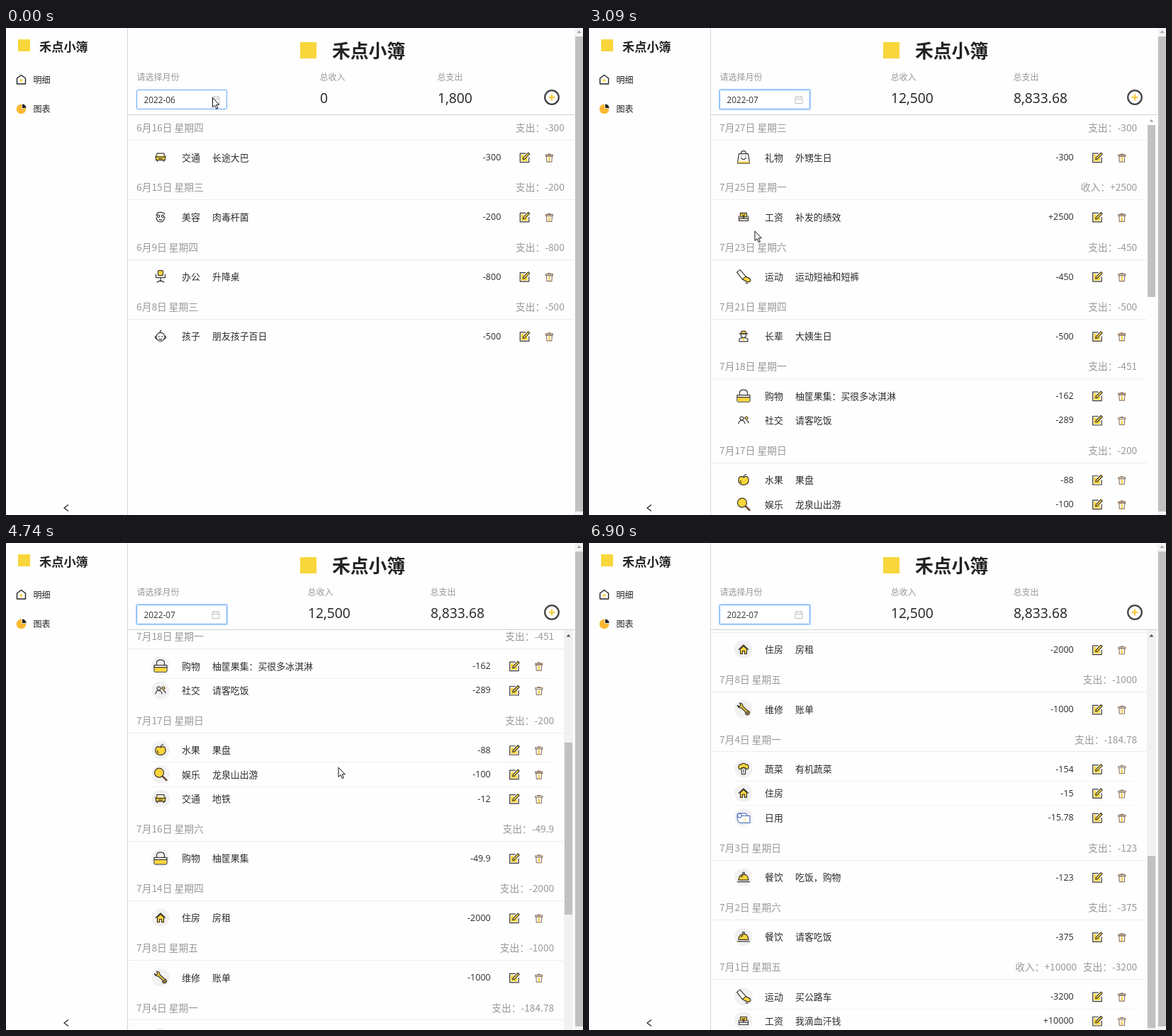
These frames come from a looping animation (814x688 px, 7.9 s). An HTML page:

```html
<!DOCTYPE html>
<html lang="zh-CN">
<head>
<meta charset="utf-8">
<title>记账</title>
<style>
html, body { margin: 0; width: 100%; height: 100%; overflow: hidden; background: #fefefe; }
#stage { position: relative; width: 814px; height: 688px; overflow: hidden; }
svg { position: absolute; left: 0; top: 0; overflow: visible; }
text { font-family: "Noto Sans CJK SC", "Noto Sans CJK", sans-serif; white-space: pre; }
text.num { font-family: "Open Sans", "Noto Sans", sans-serif; }
.ic { fill: none; stroke: #3b3733; stroke-width: 1.2; stroke-linejoin: round; stroke-linecap: round; }
.ic .y { fill: #fbd63a; }
.ic .w { fill: #fff; }
.ic .d { fill: #3b3733; stroke: none; }
.ic .g { fill: #fbd63a; stroke: none; }
.fresh .soft { visibility: hidden; }
#popup {
  position: absolute; left: 184px; top: 118px; width: 241px; height: 262px;
  background: #fff; border-radius: 2px; transform-origin: 0 0;
  box-shadow: 0 3px 5px -3px rgba(0,0,0,.12), 0 5px 14px rgba(0,0,0,.08), 0 8px 24px 7px rgba(0,0,0,.05);
}
</style>
</head>
<body>
<div id="stage">
  <svg id="page" width="814" height="688"></svg>
  <div id="popup"><svg id="months" width="241" height="262"></svg></div>
  <svg id="pointer" width="814" height="688">
    <path id="arrow" d="M.5 .5V14L3.6 11.1L5.8 16.2L7.9 15.3L5.7 10.3H9.8Z" fill="#fff" stroke="#111"/>
    <path id="hand" d="M-1.3 13V2Q-1.3 .5 .2 .5T1.7 2V7Q2 5.900 3.300 6T4.600 7.500Q5 6.600 6.200 6.800T7.300 8.300Q7.700 7.500 8.700 7.800T9.600 9.500V14Q9.600 16.500 8 18V20.300H.2V18.500Q-2 16.500-4.600 12.300Q-5 10.800-3.700 10.600T-1.300 13M1.700 7V11M4.600 8V11M7.300 8.500V11" fill="#fff" stroke="#111" stroke-linejoin="round"/>
  </svg>
</div>
<script>
const LOOP = 7900;
const $ = id => document.getElementById(id);

// y is the middle of the glyphs
function txt(x, y, s, size, fill, o = {}) {
  const base = y + size * (o.num ? .357 : .38);
  return `<text x="${x}" y="${base.toFixed(2)}" font-size="${size}" fill="${fill}"` +
    ` text-anchor="${o.anchor || 'start'}" font-weight="${o.weight || 400}"` +
    `${o.num ? ' class="num"' : ''}${o.id ? ` id="${o.id}"` : ''}>${s}</text>`;
}
const rect = (x, y, w, h, fill, more = '') =>
  `<rect x="${x}" y="${y}" width="${w}" height="${h}" fill="${fill}" ${more}/>`;
const use = (name, x, y) => `<use href="#${name}" x="${x}" y="${y}"/>`;

const ICONS = {
  car: '<path class="w" d="M-5.500 0L-5-5.500H5L5.500 0Z"/><path class="y" d="M-7-2V-.5H7V-2M-6.500-.5H6.500V4H-6.500Z"/><path d="M-4.500 4V6M4.500 4V6M-2.500 2H2.500"/>',
  face: '<path d="M-6-2Q-5-7 0-6.500Q4-7 6-4M-6 1Q-5 7 0 7T6 0"/><circle cx="-3" cy="-1" r="1.700"/><circle cx="3" cy="-1" r="1.700"/><path d="M-2 3.500Q0 5 2 3.500"/>',
  chair: '<rect class="y" x="-3.500" y="-8.500" width="7" height="7" rx="1"/><path d="M-6.500-3V1.500H6.500V-3M0 1.500V7M-5 8L0 5.500L5 8"/>',
  baby: '<circle cx="0" cy="1" r="6"/><path d="M-6 0Q-8 0-7.500 2T-5.500 3.500M6 0Q8 0 7.500 2T5.500 3.500M0-5Q-2-7 1-8M-2 4Q0 5.500 2 4"/><path class="d" d="M-3 0h1.500v1.500h-1.500ZM1.500 0H3v1.500H1.500Z"/>',
  gift: '<path class="w" d="M-6.500-5H6.500L8.500 8.500H-8.500Z"/><path class="g" d="M-8 6H8L8.300 8H-8.300Z"/><path d="M-3.500-5Q-3.500-9 0-9T3.500-5M-3.500 1Q0 5 3.500 1M-3-2v.5M3-2v.5"/>',
  cash: '<path class="y" d="M-4.500-5.500H4.500V0H-4.500Z"/><path d="M-6.500-1V5.500H6.500V-1M-6.500 2.500H6.500M-2-3.500L0-1.500L2-3.500M0-1.500V2M-2 0H2"/>',
  sport: '<path class="w" d="M-9.500-6L-5-9.500L3.500 0L-1.500 4Z"/><path class="y" d="M3 0L9 3Q11 5 8.500 7.500Q4 8-1.500 4Z"/><path d="M3 9L6 9.500"/>',
  elder: '<path class="y" d="M-4-3.500L-2.500-7H2.500L4-3.500Z"/><path d="M-6-3.500H6M-3.500-3V0Q0 4.500 3.500 0V-3"/><path class="w" d="M-6 7.500V4L-2.500 2L0 4.500L2.500 2L6 4V7.500Z"/><path class="g" d="M-2 3H2L0 7Z"/>',
  shop: '<path class="w" d="M-9-1H9V7Q9 8.500 7.500 8.500H-7.500Q-9 8.500-9 7Z"/><path class="g" d="M-8.300 2.500H8.300V8H-8.300Z"/><path d="M-5.500-1V-4Q-5.500-8.500 0-8.500T5.500-4V-1M-9 2H9"/>',
  social: '<circle cx="-2.500" cy="-2.500" r="2.500"/><path d="M-7 5Q-6.500.5-2.500.5T2 5M4 .5Q7 1 7 4"/><circle class="y" cx="4" cy="-3" r="2"/>',
  fruit: '<path class="y" d="M0-3.500Q6-7 7.300 0Q7 7 0 7.300Q-7 7-7.300 0Q-6-7 0-3.500Z"/><path d="M0-3.500Q0-7 4-7.500M-4.500 1Q-4.500 3-3 4"/>',
  fun: '<path d="M3 3L8.500 8.500" style="stroke:#6d4a33;stroke-width:2.600"/><circle class="y" cx="-2" cy="-2" r="6.500"/>',
  house: '<path class="y" d="M-4.500-1V6H-1.500V2H1.500V6H4.500V-1L0-5Z"/><path d="M-6.800 0L0-6.500L6.800 0"/>',
  wrench: '<path class="y" d="M-8.500-5.500L-6-3.500L-4-5.500L-5.500-8.500Q-1-9-1-4L5.500 2Q9 2 8.500 6Q7 9 3.500 7.500Q2 6 3 4L-3.500-2Q-8-1.500-8.500-5.500Z"/><circle class="w" cx="5.500" cy="5" r="1.200"/>',
  veg: '<path class="y" d="M-7-1Q-8-6-3-6.500Q0-9 3-6.500Q8-6 7-1Q5 2 3-1Q0-3-3-1Q-5 2-7-1Z"/><path class="w" d="M-3 0Q0-3 3 0L2.500 7.500H-2.500Z"/><path d="M0 1V5"/>',
  daily: '<g style="stroke:#5d7cc4"><path class="w" d="M-6-6H2Q5-6 5-2.500H9V7.500H-5Q-9 7-9-2.500Q-8.500-6-6-6Z"/><ellipse cx="-5.500" cy="-2.800" rx="3" ry="3"/><path d="M5-2.500H-3"/><path d="M2 2V3M2 5V6" style="stroke:#fbd63a"/></g>',
  meal: '<path class="y" d="M-7 4Q-6.500-4 0-4T7 4Z"/><circle class="w" cx="0" cy="-5.500" r="1.400"/><path d="M-8.500 6.500H8.500M-3.500 0Q-2.500-1.500-1-2"/>',
  edit: '<path d="M1-6H-6.500V6.500H6V0"/><path class="g" d="M-5-4H-1L-3.500 3L4 .5V5H-5Z"/><path class="y" d="M-2.500 2.500L-2 0L5-7L7-5L0 2Z"/>',
  bin: '<g style="stroke:#8c7460;stroke-width:1.100"><path class="w" d="M-4-2.500H4L3.500 5.500H-3.500Z"/><path d="M-5-2.500V-4.500H5V-2.500ZM-1.500-4.500V-5.500H1.500V-4.500"/><path d="M0 0V4" style="stroke:#f3c62c;stroke-width:2"/></g>'
};

// [date, weekday, totals, [icon, kind, note, amount]...]
const JUNE = [
  ['6月16日', '四', ['支出：-300'], ['car', '交通', '长途大巴', '-300']],
  ['6月15日', '三', ['支出：-200'], ['face', '美容', '肉毒杆菌', '-200']],
  ['6月9日', '四', ['支出：-800'], ['chair', '办公', '升降桌', '-800']],
  ['6月8日', '三', ['支出：-500'], ['baby', '孩子', '朋友孩子百日', '-500']]
];
const JULY = [
  ['7月27日', '三', ['支出：-300'], ['gift', '礼物', '外甥生日', '-300']],
  ['7月25日', '一', ['收入：+2500'], ['cash', '工资', '补发的绩效', '+2500']],
  ['7月23日', '六', ['支出：-450'], ['sport', '运动', '运动短袖和短裤', '-450']],
  ['7月21日', '四', ['支出：-500'], ['elder', '长辈', '大姨生日', '-500']],
  ['7月18日', '一', ['支出：-451'], ['shop', '购物', '柚筐果集：买很多冰淇淋', '-162'], ['social', '社交', '请客吃饭', '-289']],
  ['7月17日', '日', ['支出：-200'], ['fruit', '水果', '果盘', '-88'], ['fun', '娱乐', '龙泉山出游', '-100'], ['car', '交通', '地铁', '-12']],
  ['7月16日', '六', ['支出：-49.9'], ['shop', '购物', '柚筐果集', '-49.9']],
  ['7月14日', '四', ['支出：-2000'], ['house', '住房', '房租', '-2000']],
  ['7月8日', '五', ['支出：-1000'], ['wrench', '维修', '账单', '-1000']],
  ['7月4日', '一', ['支出：-184.78'], ['veg', '蔬菜', '有机蔬菜', '-154'], ['house', '住房', '', '-15'], ['daily', '日用', '', '-15.78']],
  ['7月3日', '日', ['支出：-123'], ['meal', '餐饮', '吃饭，购物', '-123']],
  ['7月2日', '六', ['支出：-375'], ['meal', '餐饮', '请客吃饭', '-375']],
  ['7月1日', '五', ['支出：-3200', '收入：+10000'], ['sport', '运动', '买公路车', '-3200'], ['cash', '工资', '我滴血汗钱', '+10000']]
];

function list(days, right) {
  let y = 141, out = '';
  for (const [date, week, totals, ...items] of days) {
    out += txt(184, y, `${date} 星期${week}`, 13.76, '#999');
    totals.forEach((s, i) => out += txt(right - 85 * i, y, s, 13.76, '#999', { anchor: 'end' }));
    out += rect(172, Math.round(y + 17), right - 159, 1, '#ececec');
    items.forEach(([icon, kind, note, sum], i) => {
      const m = y + 41.6 + 34.4 * i;
      out += `<circle class="soft" cx="218" cy="${m}" r="12.700" fill="#f1f1f1"/>`;
      out += use(icon, 218, m) + txt(248, m, kind, 12.9, '#2b2b2b') + txt(291, m, note, 12.9, '#2b2b2b');
      out += txt(right - 89.5, m, sum, 12.5, '#2b2b2b', { num: 1, anchor: 'end' });
      out += use('edit', right - 56, m + .5) + use('bin', right - 21.4, m + 1);
      if (i) out += rect(204, Math.round(m - 17.5), right - 208, 1, '#f1f1f1', 'class="soft"');
    });
    y += 84.25 + 34.4 * (items.length - 1);
  }
  return out;
}

function totals(id, x1, income, x2, spent) {
  return `<g id="${id}">` + txt(x1, 69.5, '总收入', 12, '#999') + txt(x2, 69.5, '总支出', 12, '#999') +
    txt(x1 + .5, 99.5, income, 19.3, '#222', { num: 1 }) + txt(x2 + .5, 99.5, spent, 19.3, '#222', { num: 1 }) + '</g>';
}

const APP = '禾点小簿', YELLOW = '#f8d63c', DARK = '#333';
$('page').innerHTML =
  '<defs>' + Object.entries(ICONS).map(([k, d]) => `<g id="${k}" class="ic">${d}</g>`).join('') +
  '<clipPath id="view"><rect x="172" y="123" width="630" height="565"/></clipPath></defs>' +
  rect(171, 0, 1, 688, '#d6d6d6') + rect(171, 122, 631, 1, '#d0d0d0') +
  rect(17, 16, 17, 17, YELLOW) + txt(47, 26, APP, 17.2, '#222', { weight: 700 }) +
  rect(415, 20, 23, 23, YELLOW) + txt(460, 32.5, APP, 25.8, '#222', { weight: 700 }) +
  '<g class="ic"><path d="M15.500 71L21.500 66.500L27.500 71V79H15.500Z" style="stroke:#222;stroke-width:1.400"/><circle class="g" cx="21.500" cy="74" r="2"/></g>' +
  txt(38.5, 73, '明细', 12.1, '#222') +
  '<circle cx="21.500" cy="114.500" r="6.800" fill="#fbb830"/><path d="M22.500 113.500V107A6.500 6.500 0 0 1 29 113.500Z" fill="#222" stroke="#fefefe" stroke-width=".8"/>' +
  txt(38.5, 114, '图表', 12.1, '#222') +
  '<path d="M88 673.500L82 678L88 682.500" fill="none" stroke="#222" stroke-width="1.200"/>' +
  txt(184.5, 69, '请选择月份', 12, '#999') +
  rect(183.5, 86.5, 129, 29, 'none', 'id="glow" rx="2" stroke="#cfe4ff" stroke-width="2"') +
  rect(184.5, 87.5, 127, 27, '#fff', 'rx="1" stroke="#64a8f6"') +
  txt(194.5, 101.5, '2022-06', 11.8, DARK, { num: 1, id: 'field' }) +
  '<path d="M291 97.500H301V106.500H291ZM291 100.500H301M293.500 95.500V98.500M298.500 95.500V98.500" fill="none" stroke="#c0c0c0"/>' +
  totals('sumJune', 442.5, '0', 608.5, '1,800') + totals('sumJuly', 425.5, '12,500', 598.5, '8,833.68') +
  '<circle cx="770" cy="98" r="9.800" fill="#fff" stroke="#444" stroke-width="2.300"/><path d="M765.500 98H774.500M770 93.500V102.500" stroke="#f6c92f" stroke-width="2"/>' +
  `<g clip-path="url(#view)"><g id="june" class="fresh">${list(JUNE, 787.8)}</g>` +
  `<g id="july"><g id="rows">${list(JULY, 773.2)}</g>` +
  rect(787, 123, 13, 565, '#f1f1f1', 'class="soft"') + '<path id="up" d="M790.500 132.500H796.500L793.500 129Z"/>' +
  rect(788, 137, 11, 243, '#c1c1c1', 'id="thumb"') + '</g></g>' +
  rect(802, 0, 12, 688, '#f4f4f4') + '<path d="M805.500 7H811.500L808.500 3.500Z" fill="#a3a3a3"/>' + rect(803, 12, 11, 671, '#c1c1c1');

// month grid, relative to the popup corner
const cell = m => [45 + (m - 1) % 3 * 75.5, 63.5 + Math.floor((m - 1) / 3) * 56.6];
const pill = id => rect(0, 0, 52, 21, id === 'pick' ? '#3d8bff' : '#f3f3f3', `id="${id}" rx="2"`);
$('months').innerHTML =
  rect(0, 34, 241, 1, '#f0f0f0') +
  '<path d="M17.500 14.500L13.500 18.500L17.500 22.500M22.500 14.500L18.500 18.500L22.500 22.500M218.500 14.500L222.500 18.500L218.500 22.500M223.500 14.500L227.500 18.500L223.500 22.500" fill="none" stroke="#bcbcbc"/>' +
  txt(120.5, 17.5, '2022年', 12, '#222', { anchor: 'middle', weight: 500 }) +
  rect(158, 166.5, 76, 21, '#f3f3f3') + rect(7.5, 223, 226.5, 21, '#f3f3f3') + pill('hover') + pill('pick') +
  Array.from({ length: 12 }, (_, i) => {
    const [x, y] = cell(i + 1);
    return txt(x, y + .3, `${i + 1}月`, 11.8, i > 7 ? '#c2c2c2' : DARK, { anchor: 'middle', id: 'm' + (i + 1) });
  }).join('');

// step tables: [start, value...]
const POINTER = [
  [0, 291, 98], [500, 294, 103], [620, 300, 115], [750, 309, 138], [870, 321, 160, 1],
  [1020, 331, 181, 1], [1170, 317, 208, 1], [1320, 299, 228, 1], [1440, 272, 250, 1],
  [1560, 247, 272, 1], [1710, 241, 280, 1], [1860, 236, 284, 1], [1990, 234, 286, 1],
  [2840, 233.5, 286.5], [3520, 275, 291], [3640, 360, 304], [3770, 435, 313], [3890, 468.5, 316.5],
  [6280, 505, 365], [6400, 575, 465], [6520, 645, 562], [6640, 684, 615], [6780, 724, 650], [6900, -50, -50]
];
const SCROLL = [
  [0, 0], [4200, 75], [4320, 145], [4440, 215], [4590, 290], [4740, 345.5],
  [5010, 452], [5160, 559], [5280, 605], [5570, 665], [5720, 707], [5870, 724.6]
];
const POPUP = [[0, 0, .8], [250, .35, .88], [370, .9, .98], [500, 1, 1], [2710, .5, .92], [2840, 0, .8]];
const FIELD = [[0, '06'], [1020, '02'], [1320, '05'], [1560, '04'], [1710, '07']];
const INK = [[0, DARK], [1020, '#888'], [1170, '#bfbfbf'], [2710, DARK]];
const HOVER = [[0, 0], [870, 2], [1320, 5], [1560, 4], [1710, 7], [2710, 0]];
const PICK = [[0, 6], [2710, 7]];

function at(table, t) {
  let row = table[0];
  for (const r of table) if (r[0] <= t) row = r;
  return row.slice(1);
}
const show = (id, on) => $(id).style.display = on ? '' : 'none';
function move(id, m) {
  show(id, m);
  if (m) $(id).setAttribute('transform', `translate(${cell(m)[0] - 26} ${cell(m)[1] - 10.5})`);
}

function draw(t) {
  const july = t >= 2960, scrolled = t >= 4200;
  for (const id of ['june', 'sumJune']) show(id, !july);
  for (const id of ['july', 'sumJuly']) show(id, july);
  show('glow', t >= 250);
  $('july').setAttribute('class', scrolled ? '' : 'fresh');
  $('up').setAttribute('fill', scrolled ? '#505050' : '#a3a3a3');

  const [top] = at(SCROLL, t);
  $('rows').setAttribute('transform', `translate(0 ${-Math.round(top)})`);
  $('thumb').setAttribute('y', Math.round(137 + top * .4205));

  $('field').textContent = '2022-' + at(FIELD, t)[0];
  $('field').setAttribute('fill', at(INK, t)[0]);

  const [alpha, scale] = at(POPUP, t), [pick] = at(PICK, t);
  show('popup', alpha);
  $('popup').style.opacity = alpha;
  $('popup').style.transform = `scaleY(${scale})`;
  move('hover', at(HOVER, t)[0]);
  move('pick', pick);
  for (const m of [6, 7]) $('m' + m).setAttribute('fill', m === pick ? '#fff' : DARK);

  const [x, y, hand] = at(POINTER, t);
  show('hand', hand);
  show('arrow', !hand);
  $(hand ? 'hand' : 'arrow').setAttribute('transform', `translate(${x} ${y})`);
}

const start = performance.now();
function tick() {
  draw((performance.now() - start) % LOOP);
  requestAnimationFrame(tick);
}
tick();
</script>
</body>
</html>
```
